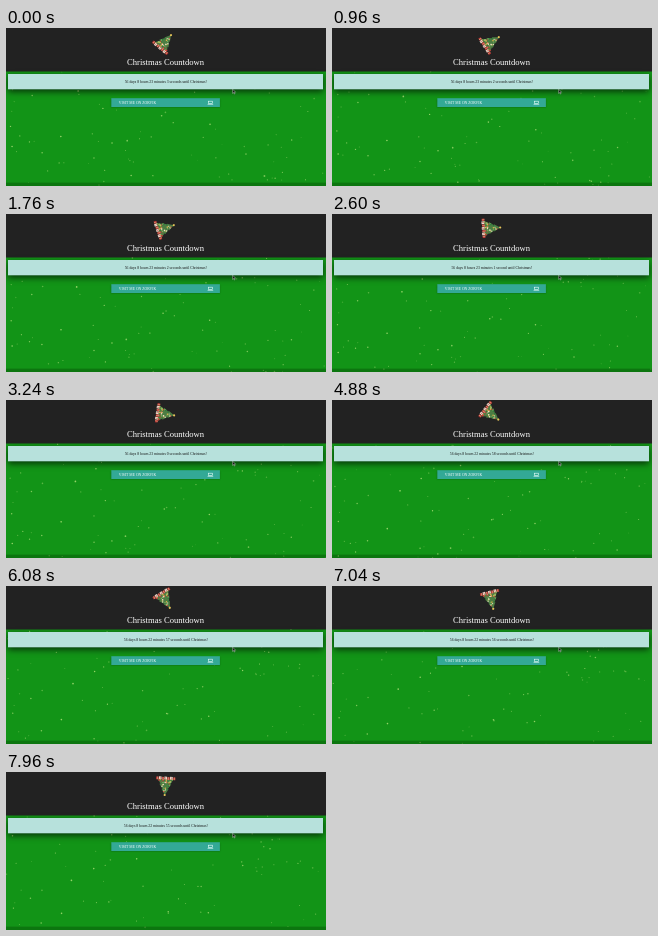
Animation, 320 px wide and 158 px high, one loop 8000 ms. Source, as an HTML page with a canvas:

```html
<!DOCTYPE html>
<html lang="en">
<head>
<meta charset="utf-8">
<title>Christmas Countdown</title>
<style>
html, body { margin: 0; width: 100%; height: 100%; overflow: hidden; background: #129417; }
canvas { display: block; width: 320px; height: 158px; }
</style>
</head>
<body>
<canvas></canvas>
<script>
const W = 320, H = 158, LOOP = 8000;
const SERIF = '"Liberation Serif", serif';
const canvas = document.querySelector('canvas');
const ctx = canvas.getContext('2d');
const ratio = window.devicePixelRatio || 1;
canvas.width = W * ratio;
canvas.height = H * ratio;

function seeded(seed) {
  return () => (seed = seed * 16807 % 2147483647) / 2147483647;
}

const random = seeded(4217);
const flakes = Array.from({ length: 95 }, () => ({
  x: random() * W,
  y: random() * 116,
  size: 0.35 + random() * 0.5,
  speed: 3 + random() * 5,
  drift: random() * 2 - 1,
  alpha: 0.25 + random() * 0.55
}));

const ornamentColors = ['#d2383b', '#f0e6c8', '#e0b64a', '#2b7a3c', '#8fbf6a'];
const ornaments = Array.from({ length: 46 }, () => {
  const y = -7.5 + 15 * Math.sqrt(random());
  return {
    x: (random() - 0.5) * (y + 8.5) * 0.95,
    y,
    r: 0.45 + random() * 0.4,
    color: ornamentColors[Math.floor(random() * ornamentColors.length)]
  };
});

function rect(x, y, w, h, color) {
  ctx.fillStyle = color;
  ctx.fillRect(x, y, w, h);
}

function dot(x, y, r, color) {
  ctx.fillStyle = color;
  ctx.beginPath();
  ctx.arc(x, y, r, 0, Math.PI * 2);
  ctx.fill();
}

function polygon(points, color) {
  ctx.beginPath();
  points.forEach(([x, y]) => ctx.lineTo(x, y));
  ctx.closePath();
  ctx.fillStyle = color;
  ctx.fill();
}

function text(value, x, y, size, color, align = 'center') {
  ctx.font = `${size}px ${SERIF}`;
  ctx.textAlign = align;
  ctx.fillStyle = color;
  ctx.fillText(value, x, y);
}

function shadowedRect(x, y, w, h, color, blur, offset, shadow) {
  ctx.save();
  ctx.shadowColor = shadow;
  ctx.shadowBlur = blur * ratio;
  ctx.shadowOffsetY = offset * ratio;
  rect(x, y, w, h, color);
  ctx.restore();
}

function drawSnow(seconds) {
  for (const f of flakes) {
    const x = (f.x + f.drift * seconds + W) % W;
    const y = 43 + (f.y + f.speed * seconds) % 116;
    dot(x, y, f.size, `rgba(190, 232, 130, ${f.alpha})`);
  }
}

function drawTree(seconds) {
  ctx.save();
  ctx.translate(159.2, 14);
  ctx.rotate((40 + 18 * seconds) * Math.PI / 180);
  polygon([[0, -9], [3.6, -3], [2.6, -3], [6, 2], [4.8, 2], [8.3, 7.5],
           [-8.3, 7.5], [-4.8, 2], [-6, 2], [-2.6, -3], [-3.6, -3]], '#4c7d43');
  ornaments.forEach(o => dot(o.x, o.y, o.r, o.color));
  // Row of presents under the branches
  for (let i = 0; i < 7; i++) {
    const x = -9.8 + i * 2.8;
    rect(x, 6.3 + (i % 2) * 0.4, 2.6, 2.7, i % 2 ? '#e9e2d0' : '#b93437');
    rect(x + 1, 6.3, 0.5, 2.7, i % 2 ? '#c9474a' : '#e6c789');
  }
  dot(0, -9, 1.1, '#e8c65a');
  ctx.restore();
}

function countdown(seconds) {
  const left = 23 * 60 + 3 - Math.floor(seconds + 0.2);
  const s = left % 60;
  return `56 days 8 hours ${Math.floor(left / 60)} minutes ${s} second${s === 1 ? '' : 's'} until Christmas!`;
}

function drawButton() {
  shadowedRect(105.3, 70.2, 108.6, 8.8, '#33a996', 1.5, 0.6, 'rgba(0,0,0,.3)');
  text('VISIT ME ON ZORVIK', 112.8, 75.8, 3.75, '#fff', 'left');
  ctx.strokeStyle = '#e8fffa';
  ctx.lineWidth = 0.6;
  ctx.strokeRect(202.4, 73.2, 4, 2.2);
  ctx.beginPath();
  ctx.moveTo(201.6, 76.4);
  ctx.lineTo(207.2, 76.4);
  ctx.stroke();
}

function drawCursor() {
  ctx.save();
  ctx.translate(226.6, 61.2);
  const arrow = [[0, 0], [0, 4.2], [1, 3.3], [1.7, 4.8], [2.4, 4.5], [1.8, 3.1], [3, 3]];
  polygon(arrow, '#111');
  ctx.strokeStyle = '#e5efe5';
  ctx.lineWidth = 0.4;
  ctx.stroke();
  ctx.restore();
}

function draw(now) {
  const seconds = now % LOOP / 1000;
  ctx.setTransform(ratio, 0, 0, ratio, 0, 0);
  rect(0, 0, W, H, '#129417');
  drawSnow(seconds);
  rect(0, 154.6, W, 3.4, 'rgba(0,60,0,.35)');

  rect(0, 0, W, 43.5, '#222');
  drawTree(seconds);
  text('Christmas Countdown', 159.5, 37.2, 8.58, '#fff');

  shadowedRect(2, 46, 315, 15.3, '#b7e1dc', 6, 2.5, 'rgba(0,0,0,.65)');
  text(countdown(seconds), 159.7, 54.8, 3.75, '#111');
  drawButton();
  drawCursor();
}

let start;
function tick(now) {
  start ??= now;
  draw(now - start);
  requestAnimationFrame(tick);
}
draw(0);
requestAnimationFrame(tick);
</script>
</body>
</html>
```
